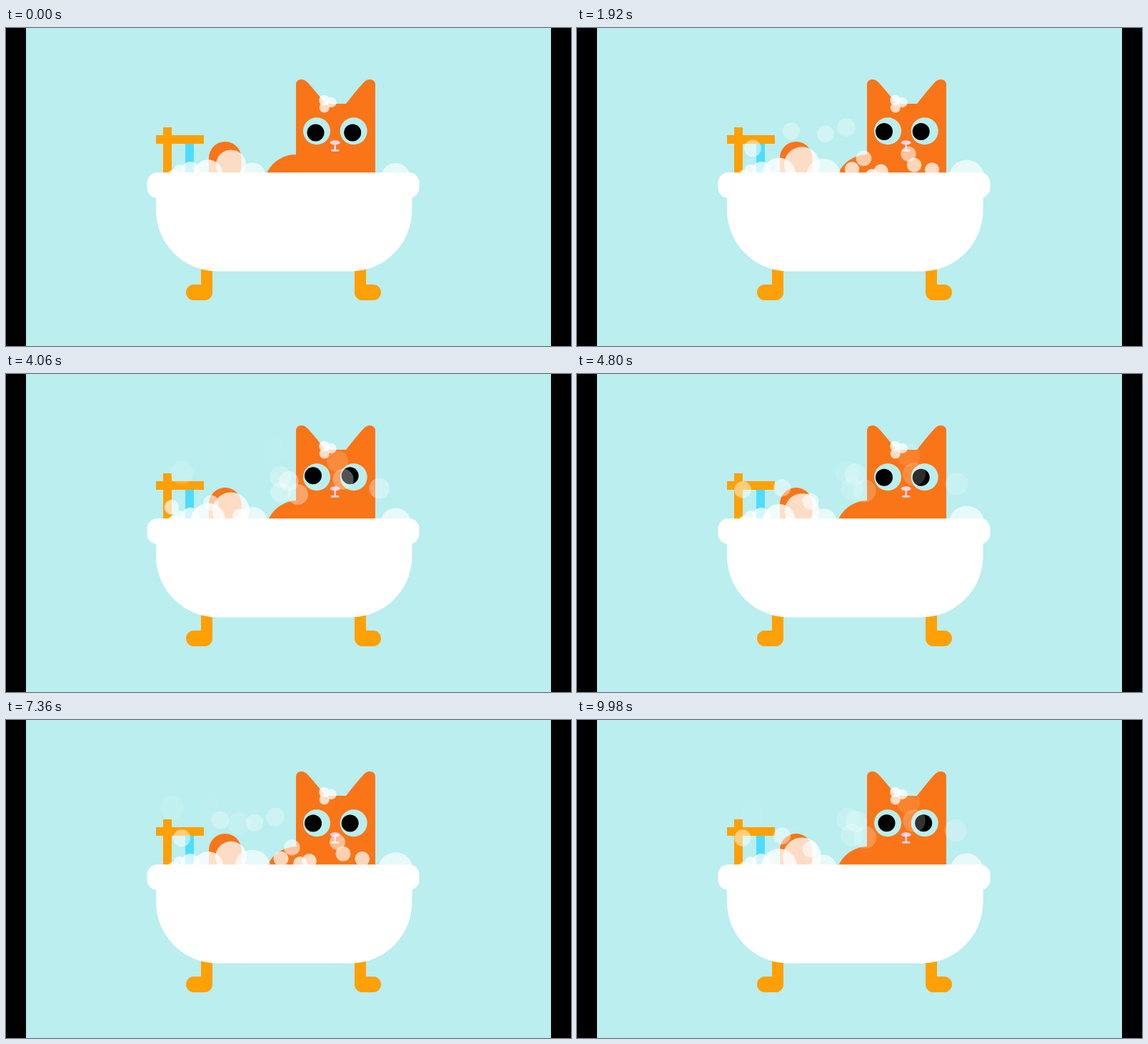
Recreate the animation shown at these times as an HTML page with a canvas. Size 791 by 445 pixels, loop 10000 ms.

```html
<!DOCTYPE html>
<html lang="en">
<head>
<meta charset="utf-8">
<title>Cat in a bubble bath</title>
<style>
html, body { margin: 0; width: 100%; height: 100%; overflow: hidden; background: #000; }
canvas { display: block; }
</style>
</head>
<body>
<canvas id="stage" width="791" height="445"></canvas>
<script>
const ctx = document.getElementById('stage').getContext('2d');
const LOOP = 10;
const PERIOD = 5.3; // rhythm shared by the bubbles and the gaze
const SKY = '#baeeef', FUR = '#f97518', GOLD = '#ffa004', PINK = '#ffd2f0';

// Each spot along the rim releases one bubble per period.
const spots = [
  { x: 246, start: 0.6, rise: 90 },
  { x: 232, start: 3.5, rise: 105 },
  { x: 287, start: 3.3, rise: 100 },
  { x: 300, start: 0.4, rise: 127 },
  { x: 327, start: 3.7, rise: 80 },
  { x: 348, start: 0.6, rise: 132 },
  { x: 377, start: 0.1, rise: 122 },
  { x: 385, start: 1.4, rise: 63 },
  { x: 408, start: 1.1, rise: 88 },
  { x: 414, start: 1.8, rise: 92 },
  { x: 429, start: 1.5, rise: 60 },
  { x: 464, start: 1.2, rise: 118 },
  { x: 472, start: 1.4, rise: 88 },
  { x: 492, start: 1.5, rise: 72 }
];

function circle(x, y, r, color, alpha = 1) {
  ctx.globalAlpha = alpha;
  ctx.fillStyle = color;
  ctx.beginPath();
  ctx.arc(x, y, r, 0, Math.PI * 2);
  ctx.fill();
  ctx.globalAlpha = 1;
}

function box(x, y, w, h, color, radii = 0) {
  ctx.fillStyle = color;
  ctx.beginPath();
  ctx.roundRect(x, y, w, h, radii);
  ctx.fill();
}

const wave = (t, peak, period) => Math.cos(2 * Math.PI * (t - peak) / period);
const smooth = k => k * k * (3 - 2 * k);

function drawTap() {
  box(251, 160, 12, 44, '#4ddcff');
  box(220, 139, 12, 66, GOLD);
  box(210, 150, 67, 12, GOLD);
}

function drawCat(t) {
  const lift = wave(t, 3.4, PERIOD);
  const toLoopEnd = Math.min(t, LOOP - t);
  const glance = 3.5 * smooth(Math.max(0, 1 - toLoopEnd / 0.6));

  box(284, 159, 45.5, 60, FUR, [22.7, 22.7, 0, 0]);
  circle(407 + 2 * lift, 222, 45, FUR);

  ctx.fillStyle = FUR;
  ctx.fill(new Path2D('M406 206V80Q406 72 413.5 72Q418.5 72 423 77Q433 88 447 106' +
    'H476Q490 88 500 77Q504.5 72 509 72Q517 72 517 80V206Z'));

  for (const eyeX of [435, 486.7]) {
    circle(eyeX, 144.3, 19, SKY);
    circle(eyeX - 5 + glance, 144.5 - 3 * lift, 12, '#000');
  }

  ctx.fillStyle = PINK;
  ctx.beginPath();
  ctx.ellipse(460.7, 160.3, 7, 3, 0, 0, Math.PI * 2);
  ctx.fill();
  box(459.4, 161, 2.6, 10, PINK);
  box(455, 170, 11.5, 2.8, PINK, 1.4);

  circle(445.5, 101, 7.3, '#fff', 0.8);
  circle(455.5, 104, 7.2, '#fff', 0.75);
  circle(445.7, 111.5, 7, '#fff', 0.75);
}

function drawFoam(t) {
  const slow = 3 * wave(t, 3.2, 6.8);
  const mid = 3.5 * wave(t, 2.6, 5);
  const quick = 3 * wave(t, 1.92, 2.88);
  circle(235, 207, 9, '#fff', 0.75);
  circle(243, 199, 8, '#fff', 0.7);
  circle(258, 200, 13, '#fff', 0.75);
  circle(345, 207, 22 + mid, '#fff', 0.65);
  circle(315, 191.5, 24 + slow, '#fff', 0.75);
  circle(283, 205, 22.7 + slow * 0.7, '#fff', 0.78);
  circle(545.5, 209.5, 22 + quick, '#fff', 0.65);
}

function drawBubble(x, height, age) {
  const rise = height * (1 - Math.exp(-age / 2));
  const fade = 1 - Math.max(age / 4.3, rise / 110);
  if (age <= 0 || fade <= 0) return;
  const drift = x > 484 ? 12 : x > 395 && x < 430 ? -8 : 0;
  circle(x + drift * age, 212 - rise, 9.2 * (1 + 0.22 * age), '#fff', 0.85 * fade);
}

function drawBubbles(t) {
  for (const { x, start, rise } of spots) {
    for (let born = start; born < t; born += PERIOD) drawBubble(x, rise, t - born);
  }
}

function drawTub() {
  box(273, 335, 16, 46, GOLD, [0, 0, 12, 0]);
  box(252, 359, 37, 22, GOLD, [11, 0, 11, 11]);
  box(488, 335, 16, 46, GOLD, [0, 0, 0, 12]);
  box(488, 359, 37, 22, GOLD, [0, 11, 11, 11]);
  box(210, 215, 358.5, 125.5, '#fff', [0, 0, 86, 86]);
  box(197.5, 202.3, 381, 35.5, '#fff', 14);
}

function frame(now) {
  const t = (now / 1000) % LOOP;
  box(0, 0, 791, 445, '#000');
  box(28, 0, 735, 445, SKY);
  drawTap();
  drawCat(t);
  drawFoam(t);
  drawBubbles(t);
  drawTub();
  requestAnimationFrame(frame);
}

requestAnimationFrame(frame);
</script>
</body>
</html>
```
